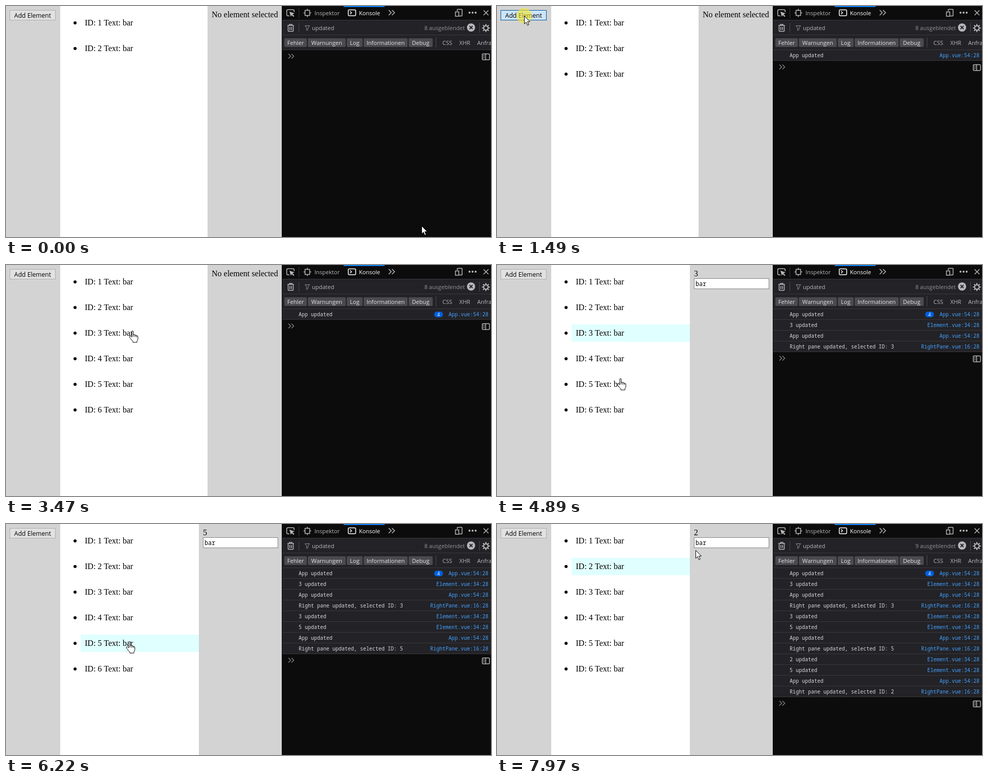
Recreate the animation shown at these times as an HTML page with a canvas. Size 948 by 451 pixels, loop 8 s.

```html
<!DOCTYPE html>
<html lang="en">
<head>
<meta charset="utf-8">
<title>Element list with console</title>
<style>
  html, body { margin: 0; width: 100%; height: 100%; overflow: hidden; background: #d3d3d3; }
  canvas { display: block; }
</style>
</head>
<body>
<canvas id="stage" width="948" height="451"></canvas>
<script>
const ctx = document.getElementById('stage').getContext('2d', { alpha: false });
const LOOP = 8000;
const SERIF = '16px "Liberation Serif", serif';
const UI = '11.1px "Open Sans", sans-serif';
const MONO = '10px "Noto Sans Mono", monospace';
const DARK = '#0c0c0d', PANEL = '#232327', RULE = '#38383d', ICON = '#b8b8ba', LINK = '#45a1ff';

// Pointer moves: start, end, number of steps, then [step, x, y] points.
const moves = [
  [70, 780, 10, [[0, 812, 429], [10, 53, 19]]],
  [2760, 3470, 10, [[0, 53, 19], [10, 245, 128]]],
  [4330, 5130, 11, [[0, 245, 128], [4, 229, 174], [8, 239, 221], [11, 239, 232]]],
  [6220, 6700, 7, [[0, 239, 232], [1, 239, 229], [5, 226, 142], [7, 226, 122]]],
  [6860, 7020, 3, [[0, 226, 122], [2, 219, 90], [3, 221, 81]]],
  [7650, 7970, 5, [[0, 221, 81], [5, 388, 51]]]
];
const presses = [[940, 1020], [1490, 1570], [1970, 2120], [2440, 2600],
                 [3550, 3630], [5210, 5290], [7260, 7410]];
const rowAdded = [1020, 1570, 2120, 2600];
const appLogged = [1100, 1650, 2200, 2680];
const selections = [
  { at: 3630, logAt: 3710, id: 3, rows: [3] },
  { at: 5290, logAt: 5370, id: 5, rows: [3, 5] },
  { at: 7410, logAt: 7570, id: 2, rows: [2, 5] }
];

function box(x, y, w, h, color) {
  ctx.fillStyle = color;
  ctx.fillRect(x, y, w, h);
}
function pill(x, y, w, h, r, color) {
  ctx.fillStyle = color;
  ctx.beginPath();
  ctx.roundRect(x, y, w, h, r);
  ctx.fill();
}
function disc(x, y, r, color) {
  ctx.fillStyle = color;
  ctx.beginPath();
  ctx.arc(x, y, r, 0, Math.PI * 2);
  ctx.fill();
}
function frame(x, y, w, h, color, fill) {
  box(x, y, w, h, color);
  box(x + 1, y + 1, w - 2, h - 2, fill);
}
function text(str, x, y, font, color, align = 'left') {
  ctx.font = font;
  ctx.fillStyle = color;
  ctx.textAlign = align;
  ctx.fillText(str, x, y);
}
function line(d, color = ICON, width = 1.5) {
  ctx.strokeStyle = color;
  ctx.lineWidth = width;
  ctx.stroke(new Path2D(d));
}
function solid(d, color = ICON) {
  ctx.fillStyle = color;
  ctx.fill(new Path2D(d));
}

// Smooth curve through the points, at rest at both ends.
function along(points, s) {
  const last = points.length - 1;
  let i = 0;
  while (i < last - 1 && s > points[i + 1][0]) i++;
  const a = points[i], b = points[i + 1], h = b[0] - a[0], u = (s - a[0]) / h;
  const slope = (k, c) => k === 0 || k === last ? 0 :
    (points[k + 1][c] - points[k - 1][c]) / (points[k + 1][0] - points[k - 1][0]);
  return [1, 2].map(c => {
    const ease = u * u * (3 - 2 * u);
    return a[c] + (b[c] - a[c]) * ease +
      h * u * (1 - u) * ((1 - u) * slope(i, c) - u * slope(i + 1, c));
  });
}
function pointer(t) {
  let move = moves[0];
  for (const m of moves) if (t >= m[0]) move = m;
  const [start, end, steps, points] = move;
  if (t < start) return points[0].slice(1);
  const step = Math.floor((t - start) / (end - start) * (steps - 1) + 0.02) + 1;
  return along(points, Math.min(step, steps)).map(Math.round);
}

function stateAt(t) {
  const count = times => times.filter(at => t >= at).length;
  const done = selections.filter(s => t >= s.at);
  const logs = [];
  const app = count(appLogged);
  if (app) logs.push(['App updated', 'App.vue:54:28', app]);
  for (const s of selections) {
    if (t < s.logAt) continue;
    for (const id of s.rows) logs.push([id + ' updated', 'Element.vue:34:28']);
    logs.push(['App updated', 'App.vue:54:28']);
    logs.push(['Right pane updated, selected ID: ' + s.id, 'RightPane.vue:16:28']);
  }
  return {
    rows: 2 + count(rowAdded),
    selected: done.length ? done[done.length - 1].id : 0,
    logs,
    hidden: t >= 7490 ? 9 : 8,
    pressed: presses.some(([a, b]) => t >= a && t < b),
    mouse: pointer(t)
  };
}

function drawPage(s, right) {
  const [mx, my] = s.mouse;
  const hover = mx >= 7 && mx < 97 && my >= 8 && my < 28;
  box(0, 0, 540, 451, '#d3d3d3');
  box(106, 0, right - 106, 451, '#fff');

  const [edge, fill] = !hover ? ['#adadad', '#e1e1e1'] :
    s.pressed ? ['#005499', '#cce4f7'] : ['#0078d7', '#e5f1fb'];
  frame(7, 8, 90, 20, edge, fill);
  text('Add Element', 52, 23, '12.1px "Open Sans", sans-serif', '#000', 'center');

  for (let id = 1; id <= s.rows; id++) {
    const y = id * 50 - 34;
    if (id === s.selected) box(146, y, right - 146, 34, '#e0ffff');
    disc(135, y + 17, 3, '#000');
    text(`ID: ${id} Text: bar`, 154, y + 22, SERIF, '#000');
  }

  if (s.selected) {
    text(s.selected, 385, 22, SERIF, '#000');
    frame(385, 26, 147, 21, '#848484', '#fff');
    text('bar', 388, 41, '11.7px "Noto Sans Mono", monospace', '#000');
  } else {
    text('No element selected', 402, 22, SERIF, '#000');
  }
}

function drawTabs() {
  box(539, 0, 409, 451, DARK);
  box(540, 27, 408, 1, RULE);
  box(660, 0, 80, 2, '#0a84ff');

  line('M554 19.2H551Q548.7 19.2 548.7 17V9.5Q548.7 7.2 551 7.2H561Q563.3 7.2 563.3 9.5V12');
  solid('M554 11L564 14.6L560 16.2L563.6 19.6L562 21.2L558.4 17.8L556.8 21Z');
  box(572, 4, 1, 20, RULE);

  line('M584.5 8.5H593.5V18.5H584.5ZM589 5.5V8M589 19V21.5M581.5 13.5H584M594 13.5H596.5');
  text('Inspektor', 603, 18, UI, ICON);

  line('M671 7.5H681.5Q683.5 7.5 683.5 9.5V17Q683.5 19 681.5 19H671Q669 19 669 17V9.5Q669 7.5 671 7.5ZM672.5 10.5L675.5 13.3L672.5 16', '#fff');
  text('Konsole', 690, 18, UI, '#fff');
  line('M748 8L753 13L748 18M754.5 8L759.5 13L754.5 18');

  line('M882 10V7.5Q882 6.5 883 6.5H890.5Q891.5 6.5 891.5 7.5V18.5Q891.5 19.5 890.5 19.5H886M878.5 11.5H885V20H878.5Z');
  for (let i = 0; i < 3; i++) disc(906 + i * 6, 13, 1.9, ICON);
  line('M933.5 8.5L943 18M943 8.5L933.5 18');
}

function drawFilters(hidden) {
  box(540, 28, 408, 57, PANEL);
  box(540, 56, 408, 1, RULE);
  box(540, 85, 408, 1, RULE);

  line('M550 38H563M554 37.5V36H559V37.5M551.5 39V48.5Q551.5 49.5 552.5 49.5H560.5Q561.5 49.5 561.5 48.5V39M554.8 41V47M558.2 41V47');
  box(572, 33, 1, 19, '#4a4a4f');
  line('M584.5 38.5H593.5L590.3 42.8V46L587.7 48V42.8Z', '#939395', 1);
  text('updated', 598, 47, UI, ICON);
  text(hidden + ' ausgeblendet', 897, 47, UI, '#939395', 'right');
  disc(909, 42, 8, ICON);
  line('M906 39L912 45M912 39L906 45', PANEL, 1.8);
  box(925, 33, 1, 19, '#4a4a4f');

  let teeth = '';
  for (let i = 0; i < 8; i++) {
    const c = Math.cos(i * Math.PI / 4), n = Math.sin(i * Math.PI / 4);
    teeth += `M${938 + c * 5} ${43 + n * 5}L${938 + c * 7.7} ${43 + n * 7.7}`;
  }
  line(teeth, ICON, 2.2);
  ctx.beginPath();
  ctx.arc(938, 43, 4.3, 0, Math.PI * 2);
  ctx.lineWidth = 2;
  ctx.stroke();

  const levels = [['Fehler', 544, 44], ['Warnungen', 590, 74], ['Log', 666, 31],
                  ['Informationen', 699, 86], ['Debug', 787, 47]];
  for (const [label, x, w] of levels) {
    pill(x, 63, w, 17, 2, '#4a4a4f');
    text(label, x + w / 2, 76, UI, '#e4e4e8', 'center');
  }
  box(840, 61, 1, 20, '#4a4a4f');
  text('CSS', 853, 76, UI, ICON);
  text('XHR', 886, 76, UI, ICON);
  text('Anfragen', 921, 76, UI, ICON);
}

function drawLogs(logs) {
  logs.forEach(([message, place, repeats], i) => {
    const y = 86 + i * 21;
    box(540, y, 408, 20, PANEL);
    box(540, y + 20, 408, 1, RULE);
    text(message, 572, y + 14, MONO, '#d7d7db');
    text(place, 943, y + 14, MONO, LINK, 'right');
    if (repeats > 1) {
      pill(837, y + 5, 17, 11, 5.5, '#0060df');
      text(repeats, 845.5, y + 14, '9px "Open Sans", sans-serif', '#fff', 'center');
    }
  });

  ctx.save();
  ctx.translate(0, logs.length * 21);
  line('M552 93.5L556.5 98L552 102.5M558 93.5L562.5 98L558 102.5', '#85858a', 1.4);
  line('M932.5 93.5H943.5Q945 93.5 945 95V103.5Q945 105 943.5 105H932.5Q931 105 931 103.5V95Q931 93.5 932.5 93.5ZM937.5 93.5V105');
  line('M932.8 96.5H935.5M932.8 99H935.5M932.8 101.5H935.5', ICON, 1);
  ctx.restore();
}

const ARROW = new Path2D('M.5 .5V16L4 12.6L6.6 18.6L9.2 17.5L6.6 11.7H11.5Z');
const HAND = new Path2D('M1 13V2Q1 .5 2.3 .5Q3.8 .5 3.8 2V8Q6.6 7 7 9Q9.6 8 10 10Q12.8 9.4 12.8 12V16.5Q12.8 18 11 20.5V23H3V21Q0 18.5 -1.5 15.5L-3.7 12.8Q-4.3 11 -2.7 10.6Q-1 10.6 1 13Z');
const KNUCKLES = new Path2D('M3.8 8V12M7 9V12.5M10 10V13');

function drawMouse(s, right) {
  const [x, y] = s.mouse;
  if (s.pressed) disc(x, y, 15, 'rgba(245,232,40,.6)');
  const row = Math.floor((y - 16) / 50) + 1;
  const overRow = x >= 146 && x < right && row >= 1 && row <= s.rows && (y - 16) % 50 < 34;
  ctx.save();
  ctx.translate(x, y);
  ctx.fillStyle = '#fff';
  ctx.strokeStyle = '#000';
  ctx.lineWidth = 1;
  ctx.lineJoin = 'round';
  const shape = overRow ? HAND : ARROW;
  ctx.fill(shape);
  ctx.stroke(shape);
  if (overRow) ctx.stroke(KNUCKLES);
  ctx.restore();
}

function draw(t) {
  const s = stateAt(t);
  const right = s.selected ? 377 : 394;
  drawPage(s, right);
  drawTabs();
  drawFilters(s.hidden);
  drawLogs(s.logs);
  drawMouse(s, right);
}

const start = performance.now();
function tick() {
  draw((performance.now() - start) % LOOP);
  requestAnimationFrame(tick);
}
tick();
</script>
</body>
</html>
```
